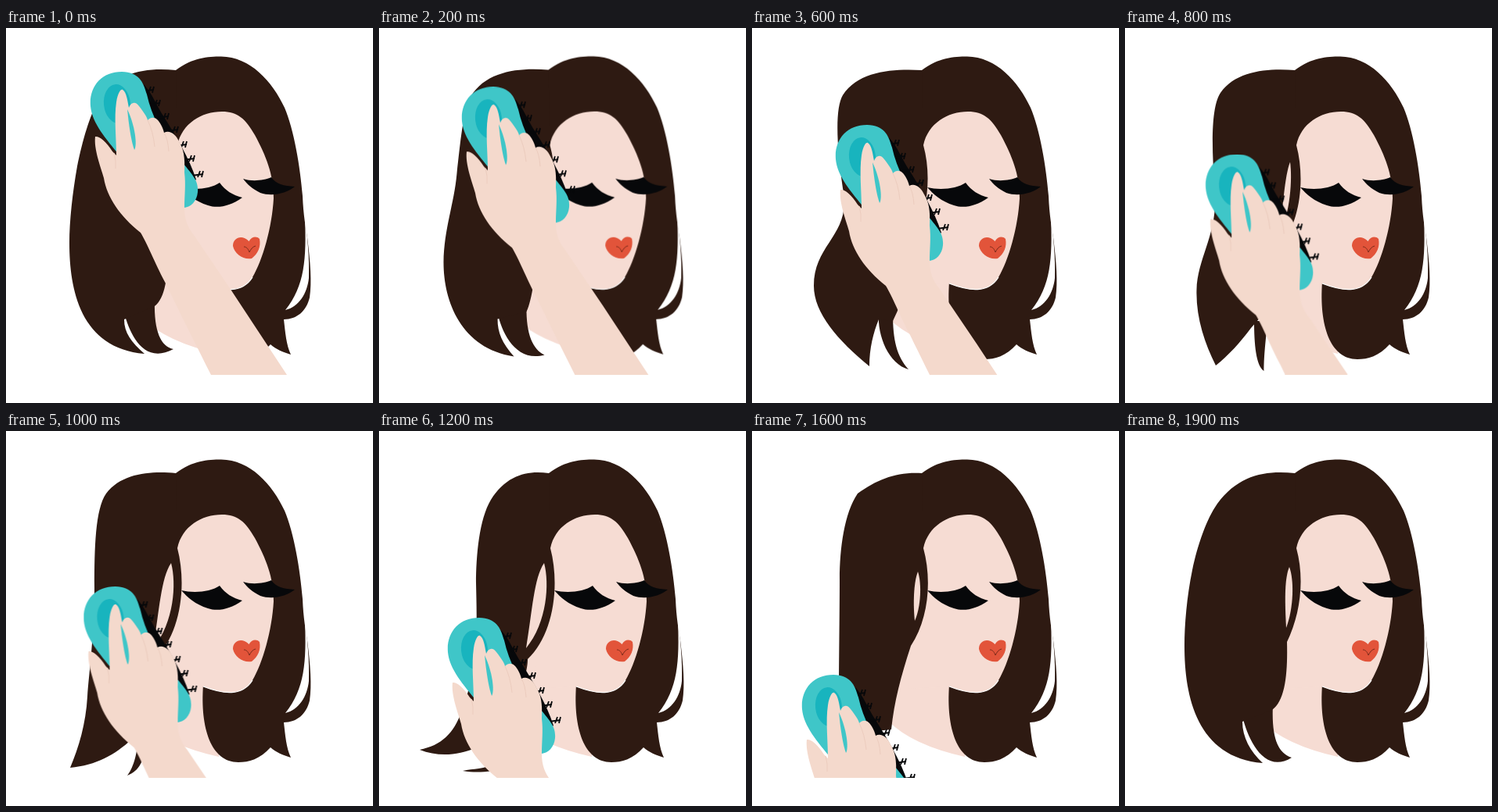
These frames come from a looping animation (469 by 480 pixels, 2.1 s). An HTML page without scripts:

```html
<!DOCTYPE html>
<html lang="en">
<head>
<meta charset="utf-8">
<title>Brushing hair</title>
<style>
  html, body { margin: 0; width: 100%; height: 100%; overflow: hidden; background: #fff; }
  svg { display: block; width: 469px; height: 444px; overflow: hidden; }

  .hair { fill: #2e1a12; }
  .skin { fill: #f6dcd3; }
  .arm { fill: #f4d9cc; }
  .teal { fill: #3fc6c8; }
  .ink { fill: #07080a; }

  /* The drawing advances every 100 ms: each stretch is cut into that many steps. */
  .move { animation: 2100ms infinite; }
  #head { animation-name: nod; }
  #side { animation-name: side; }
  #lock { animation-name: lock; }
  #ear { animation-name: ear; }
  #hand { animation-name: stroke; }

  @keyframes nod {
    0% { transform: none; animation-timing-function: steps(4); }
    19.0476% { transform: translate(-1.5px, -.5px); animation-timing-function: steps(2); }
    28.5714%, 100% { transform: none; }
  }

  @keyframes stroke {
    0% { transform: translate(0, 0); visibility: visible; animation-timing-function: steps(4); }
    19.0476% { transform: translate(-4px, 38.5px); animation-timing-function: steps(2); }
    28.5714% { transform: translate(-1px, 68px); animation-timing-function: steps(4); }
    47.619% { transform: translate(-8.5px, 143px); animation-timing-function: steps(2); }
    57.1428% { transform: translate(-20px, 183px); animation-timing-function: steps(4); }
    76.1904% { transform: translate(-44px, 256px); visibility: visible; animation-timing-function: steps(3); }
    90.4761%, 100% { transform: translate(-62px, 311.5px); visibility: hidden; }
  }

  @keyframes side {
    0% {
      d: path("M217 54C180 50 140 56 118 93C107 112 98 143 91 177C85 211 81 247 81 275C81 335 95 410 177 417C160 402 151 390 151 373L190 356C205 345 208 310 207 270C224 235 230 190 219 150Z");
      animation-timing-function: steps(4);
    }
    19.0476% {
      d: path("M216 53.5C180 51 134 54 117 82C108 98 110 150 108 195C107 240 85 267 84 325C84 365 115 410 168 424C155 405 152 390 152 372L187 370C187 350 190 320 206 270C223 235 229 190 218 150Z");
      animation-timing-function: steps(2);
    }
    28.5714% {
      d: path("M217 54C180 52 136 55 116 86C106 103 108 150 116 205C128 265 79 275 79 330C79 365 110 400 150 433C150 410 155 390 162 373L180 375C195 345 206 310 207 270C224 235 230 190 219 150Z");
      animation-timing-function: steps(4);
    }
    47.619% {
      d: path("M217 54C188 51 148 53 128 80C114 100 113 150 113 200C113 260 106 310 104 340C102 375 93 405 82 431C115 428 140 414 160 395L180 350C188 325 190 305 190 292C222 262 232 200 219 150Z");
      animation-timing-function: steps(2);
    }
    57.1428% {
      d: path("M217 54C190 50 163 56 143 88C128 113 124 160 124 195C125 240 128 300 106 358C95 388 80 402 52 408C75 417 100 416 125 405L170 350C185 325 190 305 190 292C222 262 232 200 219 150Z");
      animation-timing-function: steps(4);
    }
    76.1904% {
      d: path("M217 54C185 52 160 62 135 80C118 105 112 150 112 190C112 240 111 300 111 340C111 350 115 355 120 360C130 370 140 380 150 385L178 382C182 345 190 315 203 275C226 240 230 190 219 150Z");
      animation-timing-function: steps(3);
    }
    90.4761%, 100% {
      d: path("M217 54C180 50 145 56 118 93C104 113 93 145 86 178C79 212 76 248 76 275C76 340 92 418 176 425C160 410 150 392 150 372L188 357C205 345 208 310 207 270C224 235 230 190 219 150Z");
    }
  }

  @keyframes lock {
    0% { d: path("M151 365C158 390 175 432 214 411C198 408 189 388 190 350Z"); animation-timing-function: steps(4); }
    19.0476% { d: path("M152 365C156 390 175 425 209 426C195 415 187 395 187 365Z"); animation-timing-function: steps(2); }
    28.5714% { d: path("M162 365C160 395 175 430 200 437C185 420 180 400 180 365Z"); animation-timing-function: steps(4); }
    47.619% { d: path("M168 385C170 415 160 435 155 441C170 435 176 425 185 385Z"); animation-timing-function: steps(2); }
    57.1428% { d: path("M150 425C135 433 120 432 107 435C120 437 130 437 145 435Z"); animation-timing-function: steps(4); }
    76.1904% { d: path("M130 380C135 385 140 390 150 395C155 390 160 390 165 385Z"); animation-timing-function: steps(3); }
    90.4761%, 100% { d: path("M150 365C157 395 178 440 213 418C195 412 187 392 189 350Z"); }
  }

  @keyframes ear {
    0%, 28.5714% { d: path("M211 174C210 190 208 230 206 252C208 230 210 190 211 174Z"); animation-timing-function: steps(4); }
    47.619%, 57.1428% { d: path("M211 169C198 188 196 230 188 278C215 245 218 195 211 169Z"); animation-timing-function: steps(4); }
    76.1904% { d: path("M212 180C206 195 206 225 208 243C216 225 217 195 212 180Z"); animation-timing-function: steps(3); }
    90.4761%, 100% { d: path("M210 174C204 188 204 215 206 252C216 225 216 190 210 174Z"); }
  }
</style>
</head>
<body>
<svg viewBox="0 0 469 444">
  <defs>
    <path id="tuft" d="M-12 2L3 0M-1 -4l-3 8M3 -4l-2 8" fill="none" stroke="#07080a" stroke-width="1.8"/>
    <clipPath id="stage"><rect width="469" height="443.5"/></clipPath>
  </defs>

  <g clip-path="url(#stage)">
    <g id="head" class="move">
      <!-- neck, hair behind the face, gap beside the far strand -->
      <path class="skin" d="M190 240L175 372Q205 402 272 417L275 240Z"/>
      <path class="hair" d="M205 54L217 54C238 38 258 36.5 275 36.5C312 37 340 68 356 102C368 130 376 178 379 215C380 240 383 255 385 268C389 300 391 325 388 345C384 362 372 373 355 373C357 390 358 405 364 418C354 415 345 411 338 405C325 420 310 424 297 424C262 424 248 380 252 325L260 250L215 150L190 110Z"/>
      <path fill="#fff" d="M382 243C384 295 382 330 357 361C374 357 385 340 387 320C388 295 385 265 382 243Z"/>

      <!-- face -->
      <path class="skin" d="M219 150C225 122 250 107 276 107C296 107 306 116 318 137C332 163 342 187 342 218C340 255 328 297 315 319C302 340 278 337 252 327L200 330L205 170Z"/>
      <path d="M252 327C278 337 302 340 315 319" fill="none" stroke="#fff" stroke-width="1.2"/>
      <path class="ink" d="M224 204C240 208 262 206 273 198C280 208 290 214 302 217C285 229 270 231 258 227C242 222 232 213 224 204Z"/>
      <path class="ink" d="M303 193C315 197 330 195 339 191C345 200 355 202 369 203C358 212 340 216 325 211C315 206 308 200 303 193Z"/>
      <path fill="#e2543a" d="M310.500 273C314 267 320 266 324 270C326 280 322 289 314 295C303 297 292 289 290 279C290 268 302 264 310.500 273Z"/>
      <path d="M304 280C308 280 310 284 311 287C313 283 315 280 319 279" fill="none" stroke="#7a2a1a"/>
    </g>

    <!-- hair being brushed -->
    <path id="lock" class="hair move"/>
    <path id="side" class="hair move"/>
    <path id="ear" class="skin move"/>

    <g id="hand" class="move">
      <path class="ink" d="M176 72C187 84 192 99 202 114C218 140 234 166 243 194L236 200L180 110Z"/>
      <use href="#tuft" x="186" y="79"/>
      <use href="#tuft" x="194" y="96"/>
      <use href="#tuft" x="205" y="113"/>
      <use href="#tuft" x="217" y="130"/>
      <use href="#tuft" x="228" y="149"/>
      <use href="#tuft" x="238" y="167"/>
      <use href="#tuft" x="249" y="187"/>
      <path class="teal" d="M108 100C106 75 122 56 148 56C170 57 175 68 180 85C186 112 200 140 222 168C240 190 246 195 245 210C244 222 236 229 228 230L180 200L145 163C128 142 110 122 108 100Z"/>
      <ellipse cx="142" cy="97" rx="17" ry="25" fill="#18b4be" transform="rotate(-6 142 97)"/>
      <path class="arm" d="M114 139C119 138 128 145 136 158L141 163C141 140 138 115 141 95C143 82 147 78 149 79C154 82 155 92 157 102C160 94 166 94 170 100C176 108 180 113 181 118C187 112 193 115 197 122C200 127 201 130 202 134C209 130 217 136 221 145C227 155 229 165 228 185C230 200 228 215 228 230C228 245 232 255 240 265L288 336L359 444L262 444C245 410 215 350 203 325C190 300 180 275 172 262C146 241 129 217 125 192C121 178 112 155 114 139Z"/>
      <path class="teal" d="M155 104C157 125 160 145 164 156C168 150 165 125 155 104Z"/>
      <path d="M181 118Q188 132 190 152M202 134Q207 142 208 158M138 160Q141 170 140 180" fill="none" stroke="#ecccbe"/>
    </g>
  </g>
</svg>
</body>
</html>
```
